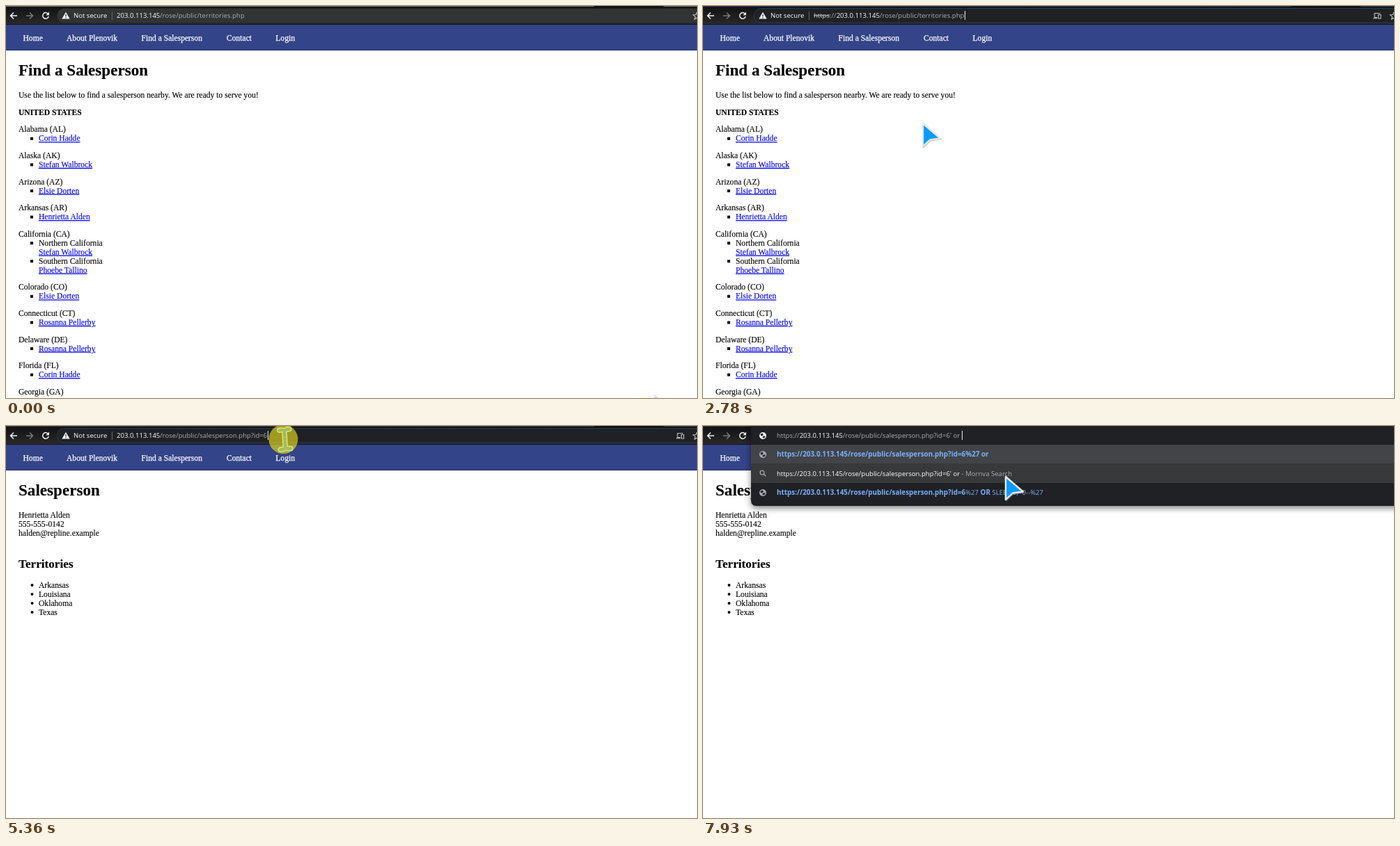
These frames come from a looping animation (993 px wide and 564 px high, 8 s). An HTML page:

```html
<!DOCTYPE html>
<html lang="en">
<head>
<meta charset="utf-8">
<title>Find a Salesperson</title>
<style>
html, body { margin: 0; width: 100%; height: 100%; overflow: hidden; background: #fff; }
svg { display: block; width: 993px; height: 564px; }
text { white-space: pre; }
.page, .nav { font: 11.6px "Liberation Serif", "Times New Roman", serif; }
.page text { stroke: #000; stroke-width: .12px; }
.page text.link { stroke: #00e; }
.nav { fill: #fff; stroke: #fff; stroke-width: .25px; }
.h1 { font-size: 23.1px; font-weight: bold; }
.h2 { font-size: 17.2px; font-weight: bold; }
.b { font-weight: bold; }
.link { fill: #00e; text-decoration: underline; }
.ui { font: 9.57px "Open Sans", "Noto Sans", sans-serif; fill: #a9aeb4; }
.ui .host, .ui.host { fill: #fff; }
.ui .cut { text-decoration: line-through; fill: #c4c7cb; }
.ui.blue { fill: #7ab0fb; }
.ui .hit { font-weight: bold; font-size: 9.9px; }
.ui.picked, .ui.picked .host { fill: #202124; }
.line { fill: none; stroke: #f1f3f4; stroke-width: 1.5; }
.thin { stroke: #c8cacd; stroke-width: 1.1; }
#drop { filter: drop-shadow(0 3px 5px rgba(0, 0, 0, .5)); }
</style>
</head>
<body>
<svg viewBox="0 0 993 564">
  <defs>
    <linearGradient id="steel" x2="0" y2="1">
      <stop offset="0" stop-color="#111112"/><stop offset="1" stop-color="#2a2a2b"/>
    </linearGradient>
    <g id="globe">
      <circle r="5"/>
      <path d="M-3.6 -2.2 L-.4 -3.4 L.8 -1.4 L-1 .2 L-2.6 .2 Z M.6 .6 L3.4 .2 L3 2.4 L.6 3.6 L-.6 2 Z" fill="#202124"/>
    </g>
    <path id="stem" d="M-7.5 -13.5Q-2 -14.5 -.5 -12Q1 -15 6.5 -15M-.5 -12L1 11.5M-6 14.5Q-.5 14.5 1 11.5Q3 13.5 8.5 13"/>
    <path id="dart" d="M1 1V34L11 24.5L26 22.5Z"/>
  </defs>

  <rect width="993" height="564" fill="#fff"/>
  <g id="list" class="page"></g>
  <g id="person" class="page"></g>
  <rect y="27" width="993" height="37" fill="#334488"/>
  <rect y="63" width="993" height="1" fill="#25346f"/>
  <g id="nav" class="nav"></g>

  <rect width="993" height="27" fill="url(#steel)"/>
  <rect y="26" width="993" height="1" fill="#141519"/>
  <path id="edge" d="M0 .5H845M945 .5H993"/>
  <path class="line" d="M16 14H7M11 9.5L6.5 14L11 18.5"/>
  <path class="line" d="M29 14H38M34 9.5L38.5 14L34 18.5" style="stroke:#77797c"/>
  <g id="reload">
    <path class="line" d="M60.2 11A4.3 4.3 0 1 0 61.2 15"/>
    <path d="M62 8.5V13.2H57.3Z" fill="#f1f3f4"/>
  </g>
  <path id="stop" class="line" d="M53 10L61 18M61 10L53 18"/>

  <rect id="pill" x="73.5" y="3.5" width="950" height="20.5" rx="10"/>
  <path d="M86 8.8L91.7 18.6H80.3Z" fill="#f1f3f4"/>
  <path d="M86 12V15.3M86 16.2V17.4" stroke="#28292b" stroke-width="1.2"/>
  <text class="ui host" x="97" y="17.3">Not secure</text>
  <path d="M152.5 8V20" stroke="#66696d"/>
  <rect id="mark" x="159" y="7" height="14.5" fill="#a6c6f2"/>
  <text id="url" class="ui" x="159" y="17.3" xml:space="preserve"></text>
  <path id="cast" class="line thin" d="M973 10.5H965V16.5H969M963 17.7H969M970.5 12.5H974V18H970.5Z"/>
  <path class="line thin" d="M993 9L991.5 12.5L987.5 12.8L990.5 15.4L989.5 19L993 17"/>

  <g id="drop">
    <path d="M69 0H1010V115H77Q69 115 69 107Z" fill="#202124"/>
    <rect x="69" y="27" width="930" height="27.5" fill="#434447"/>
    <rect x="69" y="54.5" width="930" height="27.5" fill="#38393b"/>
    <use href="#globe" x="86" y="14" fill="#f1f3f4"/>
    <use href="#globe" x="86" y="41" fill="#a4a8ad"/>
    <use href="#globe" x="86" y="96" fill="#a4a8ad"/>
    <path d="M87.9 67A2.9 2.9 0 1 0 82.1 67A2.9 2.9 0 1 0 87.9 67M87 69L90.3 72.3" fill="none" stroke="#a4a8ad" stroke-width="1.3"/>
    <text id="typed" class="ui" x="106" y="17.3" xml:space="preserve"></text>
    <text id="row1" class="ui blue" x="106" y="44.3" xml:space="preserve"></text>
    <text id="row2" class="ui" x="106" y="71.6" xml:space="preserve"></text>
    <text id="row3" class="ui blue" x="106" y="99.2" xml:space="preserve"></text>
  </g>
  <rect id="caret" y="7" width="1" height="13" fill="#e8eaed"/>

  <g id="arrow" stroke-linejoin="round">
    <use href="#dart" x="1" y="1" fill="#8a9099" stroke="#8a9099" stroke-width="2" opacity=".5"/>
    <use href="#dart" fill="#0a9bff" stroke="#e6e9ec" stroke-width="2.4"/>
  </g>
  <g id="beam" fill="none" stroke-linecap="round" stroke-linejoin="round">
    <use href="#stem" stroke="#e4f0fa" stroke-width="7.5"/>
    <use href="#stem" stroke="#1b86de" stroke-width="4.6"/>
  </g>
  <circle id="ring" r="21" fill="#e6dc1e" opacity=".65"/>
</svg>

<script>
const $ = id => document.getElementById(id);
const LOOP = 8000, TICK = 126;
const HOST = '203.0.113.145', DIR = '/rose/public/';
const LIST = DIR + 'territories.php', PERSON = DIR + 'salesperson.php?id=6';

const text = (x, y, s, cls = '') => `<text x="${x}" y="${y}" class="${cls}">${s}</text>`;
const span = (s, cls) => `<tspan class="${cls}">${s}</tspan>`;
const square = y => `<rect x="35" y="${y - 5.5}" width="4" height="4"/>`;
const disc = y => `<circle cx="37.5" cy="${y - 3.7}" r="2"/>`;

function buildNav() {
  const items = [[24.5, 'Home'], [87, 'About Plenovik'], [194.5, 'Find a Salesperson'], [317, 'Contact'], [387.5, 'Login']];
  $('nav').innerHTML = items.map(([x, s]) => text(x, 50, s)).join('');
}

function buildList() {
  const [cd, sw, ed, ha, pt, rp] = ['Corin Hadde', 'Stefan Walbrock', 'Elsie Dorten',
    'Henrietta Alden', 'Phoebe Tallino', 'Rosanna Pellerby'];
  const states = [
    ['Alabama (AL)', cd], ['Alaska (AK)', sw], ['Arizona (AZ)', ed], ['Arkansas (AR)', ha],
    ['California (CA)', ['Northern California', sw], ['Southern California', pt]],
    ['Colorado (CO)', ed], ['Connecticut (CT)', rp], ['Delaware (DE)', rp], ['Florida (FL)', cd], ['Georgia (GA)']
  ];
  let y = 181.3;
  let out = text(18, 100, 'Find a Salesperson', 'h1') +
    text(18, 132, 'Use the list below to find a salesperson nearby. We are ready to serve you!') +
    text(18, 156.6, 'UNITED STATES', 'b');
  for (const [name, ...reps] of states) {
    out += text(18, y, name);
    for (const rep of reps) {
      y += 13;
      out += square(y);
      if (Array.isArray(rep)) {
        out += text(47, y, rep[0]);
        y += 13;
      }
      out += text(47, y, [].concat(rep).pop(), 'link');
    }
    y += 24.6;
  }
  $('list').innerHTML = out;
}

function buildPerson() {
  const lines = ['Henrietta Alden', '555-555-0142', 'halden@repline.example'];
  const areas = ['Arkansas', 'Louisiana', 'Oklahoma', 'Texas'];
  $('person').innerHTML = text(18, 100, 'Salesperson', 'h1') +
    lines.map((s, i) => text(18, 132 + 13 * i, s)).join('') +
    text(18, 203.5, 'Territories', 'h2') +
    areas.map((s, i) => disc(232.7 + 13 * i) + text(47, 232.7 + 13 * i, s)).join('');
}

// pointer path: time, x, y
const PATH = [
  [0, 931, 559], [126, 918, 548], [756, 840, 490], [882, 800, 452], [1008, 603, 272], [1134, 557, 232],
  [1260, 430, 110], [1386, 372, 45], [1512, 357, 20], [1638, 357, 19], [1764, 369, 18.5], [1890, 369, 18.5],
  [2016, 395, 22], [2142, 395, 25], [2520, 395, 25], [2646, 356, 82], [2772, 315, 168], [2898, 205, 240],
  [3024, 120, 276], [3150, 104, 298], [3276, 92, 313], [3654, 92, 311], [4158, 451, -22], [4700, 451, -22],
  [4788, 440, 6], [5040, 400.5, 19.5], [5922, 400.5, 19.5], [6048, 432, 52], [6174, 455, 67], [6300, 443, 66],
  [6350, 434, 72], [LOOP, 434, 72]
];

function pointer(t) {
  const q = Math.floor((t + 15) / TICK) * TICK;
  const i = Math.max(1, PATH.findIndex(k => k[0] >= q));
  const [t0, x0, y0] = PATH[i - 1], [t1, x1, y1] = PATH[i];
  const p = (q - t0) / (t1 - t0);
  return [x0 + (x1 - x0) * p, y0 + (y1 - y0) * p];
}

const KEYS = [[7000, "'"], [7400, "' "], [7530, "' o"], [7790, "' or"], [7930, "' or "]];
const within = (t, ...spans) => spans.some(([a, b]) => t >= a && t < b);
const show = (id, on) => { $(id).style.display = on ? '' : 'none'; };
const last = {};
function put(id, html) {
  if (last[id] !== html) $(id).innerHTML = last[id] = html;
}

function drawTyping(typed) {
  const base = 'https://' + HOST + PERSON, query = typed.trim();
  const n = query.slice(2).length;
  put('typed', 'https://' + span(HOST, 'host') + PERSON + typed);
  put('row1', span(base + query.replace("'", '%27'), 'hit'));
  put('row2', span(base + query, 'host') + ' - Mornva Search');
  put('row3', span(base, 'hit') + '%27 ' + span('OR'.slice(0, n), 'hit') + 'OR'.slice(n) + ' SLEEP(5)=0--%27');
}

function draw(t) {
  const loaded = t >= 4450, loading = within(t, [3920, 4450]);
  const focus = within(t, [1870, 3430], [5090, LOOP]);
  const picked = within(t, [1870, 2380], [5090, 5350]);
  const full = within(t, [2380, 2920], [5480, LOOP]);
  const open = t >= 7000;
  const [x, y] = pointer(t);
  const inBar = y > 0 && y < 30;

  show('list', !loaded);
  show('person', loaded);
  show('reload', !loading);
  show('stop', loading);
  show('cast', within(t, [250, 3800], [4840, LOOP]));
  show('drop', open);
  $('edge').setAttribute('stroke', t < 1870 ? '#77797c' : '#34414f');

  const pill = $('pill');
  pill.setAttribute('fill', focus ? '#202124' : inBar ? '#3b3c3e' : '#323334');
  pill.setAttribute('stroke', focus ? '#263c58' : 'none');

  const scheme = full ? span('https', 'cut') + '://' : '';
  put('url', scheme + span(HOST, 'host') + (t < 3920 ? LIST : PERSON));
  $('url').setAttribute('class', picked ? 'ui picked' : 'ui');
  show('mark', picked);
  if (picked) $('mark').setAttribute('width', $('url').getComputedTextLength());

  if (open) drawTyping(KEYS.filter(k => k[0] <= t).pop()[1]);
  const caret = within(t, [2380, 2920], [5350, 6230], [6770, LOOP]);
  show('caret', caret);
  if (caret) {
    const field = open ? $('typed') : $('url');
    $('caret').setAttribute('x', Math.round((open ? 106 : 159) + field.getComputedTextLength() + .5));
  }

  show('arrow', !inBar);
  show('beam', inBar);
  $(inBar ? 'beam' : 'arrow').setAttribute('transform', `translate(${x} ${y})`);
  show('ring', within(t, [3530, 3680], [5350, 5600]));
  $('ring').setAttribute('transform', inBar ? `translate(${x - 2} ${y - .5})` : `translate(${x + 1} ${y - 3})`);
}

buildNav();
buildList();
buildPerson();
const start = performance.now();
function tick() {
  draw((performance.now() - start) % LOOP);
  requestAnimationFrame(tick);
}
tick();
</script>
</body>
</html>
```
